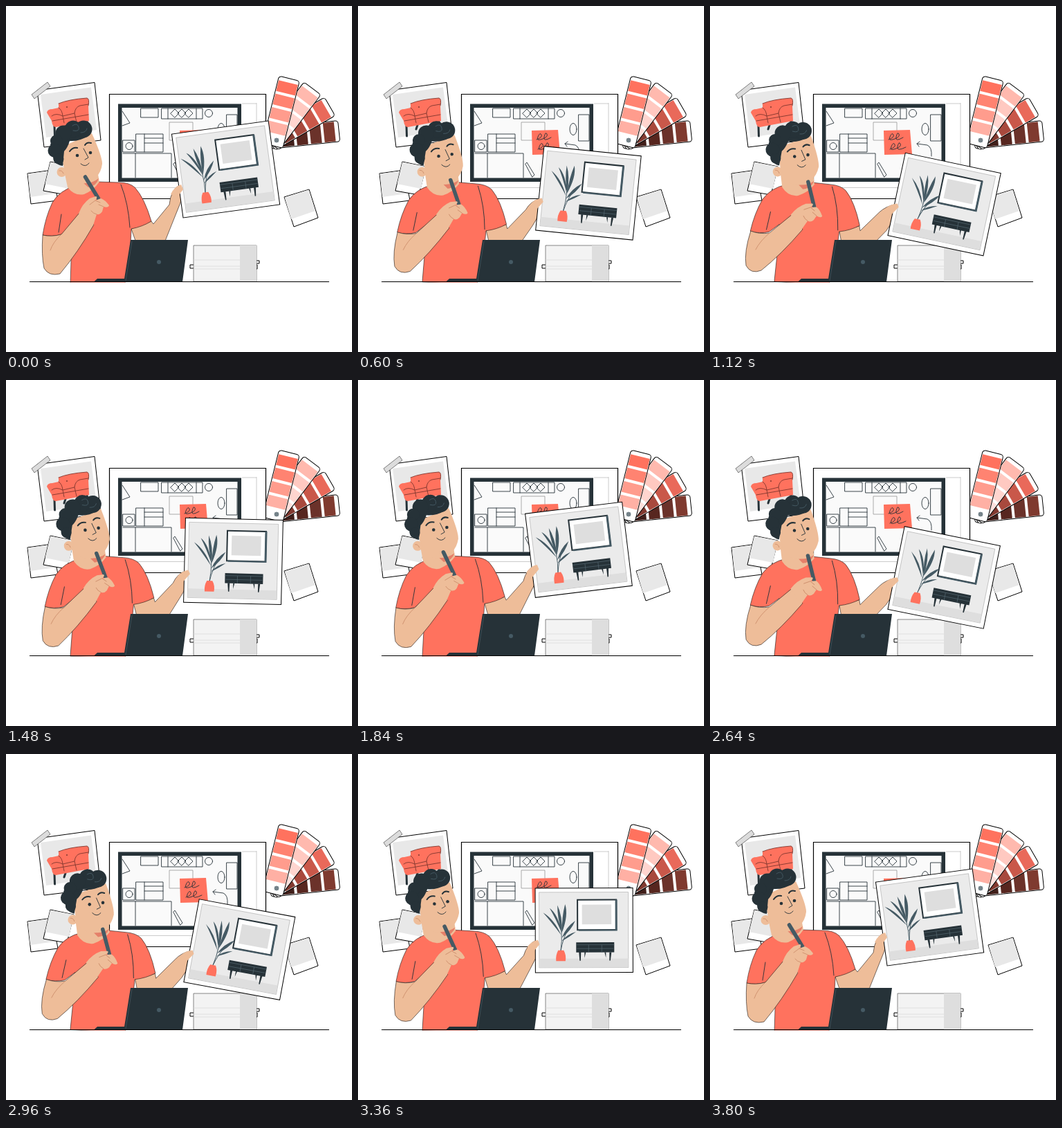
Animation, 500 px wide and 500 px high, one loop 3.88 s. Source, as an HTML page:

```html
<!DOCTYPE html>
<html lang="en">
<head>
<meta charset="utf-8">
<title>Interior designer</title>
<style>
  html, body { margin: 0; width: 100%; height: 100%; overflow: hidden; background: #fff; }
  svg { display: block; width: 100vw; height: 100vh; }
  .card { fill: #fff; stroke: #000; stroke-width: 1; }
  .grey { fill: #e8e8e8; }
  .ink { fill: #263238; }
  .slate { fill: #455a64; }
  .coral { fill: #ff725e; }
  .skin { fill: #eebd99; }
  .edge { stroke: #1d1715; stroke-width: .6; }
  .line { fill: none; stroke: #263238; stroke-width: .9; stroke-linecap: round; stroke-linejoin: round; }
  .faint { fill: none; stroke: #b5b5b5; stroke-width: .7; }
  .fold { fill: none; stroke: #c98a68; stroke-width: .8; stroke-linecap: round; }
</style>
</head>
<body>
<svg viewBox="0 0 500 500">
  <clipPath id="aboveDesk"><path d="M0 0H500V399.500H0Z"/></clipPath>

  <!-- pinned armchair picture -->
  <path class="card" d="M45 122 128 110.500 137 194 55 204Z"/>
  <path class="grey" d="M50 128 123 117.500 131 179 58 190Z"/>
  <path class="line" style="stroke-width:3" d="M70 173 70.500 188M86 172 84 178M116 164 118.500 172"/>
  <path class="coral" d="M76 141Q90 135 117 133Q121 134 119 144L120 166 72 175Q67 175 66 166L59 154Q60 149 67 149L76 147Z"/>
  <path class="line" style="stroke:#7d372f" d="M76 141Q90 135 117 133Q121 134 119 144M76 147Q81 150 82 159L99 155Q100 146 107 144L119 142M66 159Q72 154 82 159L84 169M99 155 102 168M67 166 119 157"/>
  <circle cx="88" cy="146" r="1" fill="#7d372f"/>
  <path d="M37 128 60 110 64 116 41 134Z" fill="#dcdcdc" stroke="#333" stroke-width=".6"/>

  <!-- loose cards -->
  <path class="card" d="M31 242 67 237 75 281 36 286Z"/>
  <path class="grey" d="M31.500 242.500 67 237.500 72 271 35 276Z"/>
  <path class="card" d="M64 225 98 232 88 273 54 267Z"/>
  <path class="grey" d="M64 225.500 98 232 91 264 56.500 257Z"/>
  <path class="card" d="M402 276 438 265 451 306 416 319Z"/>
  <path class="grey" d="M402.500 276.500 437.500 265.500 447 296 412 308Z"/>

  <g id="fan" transform="translate(391 194)"></g>

  <!-- monitor with floor plan -->
  <path class="card" style="stroke-width:1.200" d="M149.500 127.500H375.500V278.500H149.500Z"/>
  <path class="faint" d="M150 262.500H375M362 140V262M341 141H362"/>
  <rect x="164.750" y="144.250" width="172.500" height="107" fill="#fafafa" stroke="#263238" stroke-width="5.500"/>
  <path class="line" d="M168 152 179 169 168 173M195 148H220V161H195ZM225 148H284V163H225ZM234 148V163M275 148V163M319 157H334V195H319ZM169 194H186V211H169ZM188 185H227V211H188ZM200 185V211M200 191H227M200 198H227M169 213H239V248M187 213V248M242 228 244 226 255 244 252 247ZM299 199 314 201Q321 204 320 217M303 196 299 199 302 203"/>
  <path class="line" d="M238 155l6-6 6 6-6 6ZM248 155l6-6 6 6-6 6ZM258 155l6-6 6 6-6 6Z"/>
  <g class="line">
    <circle cx="293" cy="155" r="5.500"/><circle cx="178" cy="202.500" r="5"/>
    <ellipse cx="311" cy="178" rx="5" ry="8.500"/>
  </g>
  <path class="faint" style="stroke:#888" d="M236 168H270V194H236Z"/>
  <path class="coral" d="M251 180 289 179 292 214 252 215Z"/>
  <path class="line" d="M258 193q9-3 7-7t-5 3 7 3q8-3 6-7t-4 4 10 1M260 207q9-3 7-7t-5 3 7 3q8-3 6-7t-4 4 12 1"/>

  <!-- paper stack -->
  <path class="card" d="M266 374H273V379H266ZM355 368H366V372H355ZM355 374H363V380H355Z"/>
  <path d="M271 346H362V398H271Z" fill="#f3f3f3" stroke="#555" stroke-width=".7"/>
  <path d="M338 346H362V398H338Z" fill="#dedede"/>
  <path class="faint" style="stroke:#d4d4d4" d="M271 367H338M271 376H338M271 380H338"/>

  <!-- designer -->
  <path id="farArm" class="skin edge"/>
  <g clip-path="url(#aboveDesk)">
    <g id="torso">
      <path class="coral edge" d="M100 260Q78 266 67 284Q57 305 53 331Q66 334 80 330L94 318Q95 360 93 401L172 401 180 345 181 322Q197 319 210 311Q200 277 186 262Q178 255 163 255L132 254Z"/>
      <path class="line" d="M166 258Q177 286 179 320M80 301 76 327"/>
    </g>
  </g>
  <g id="head">
    <path class="skin" d="M84 238 89 262Q99 275 113 272Q127 266 135 254L132 238Z"/>
    <path d="M112 256Q124 257 134 249Q131 260 119 262Z" fill="#e5806a"/>
    <path class="skin" d="M78 205 85 240Q94 258 111 257Q136 252 139 228Q139 217 124 184Z"/>
    <circle class="skin" cx="80.500" cy="240" r="7"/>
    <path class="fold" d="M77 238q4-1 6 4"/>
    <g class="ink">
      <path d="M64 200 72 186 90 176 116 178 118 188Q106 196 92 195Q89 205 84 210L82 231Q74 230 69 223Z"/>
      <circle cx="112" cy="178" r="12.500"/><circle cx="97" cy="177.500" r="12"/><circle cx="83" cy="184" r="11.500"/>
      <circle cx="73" cy="195" r="9"/><circle cx="70.500" cy="209" r="10"/><circle cx="76" cy="221" r="7.500"/>
      <circle cx="103" cy="216" r="2.300"/><circle cx="122" cy="212" r="2.300"/>
    </g>
    <path class="line" style="stroke:#455a64" d="M96 173q7-5 9 2t-8 5M108 183q8 0 9-6"/>
    <path class="line" style="stroke-width:2" d="M92 210Q96 204 103 205M114 201Q117 196 123 198"/>
    <path class="line" d="M112 206 119 219 114 222M108 228Q115 234 120 227"/>
  </g>
  <path id="nearArm" class="skin edge"/>
  <path id="armFold" class="fold"/>
  <g id="hand">
    <path d="M114.500 247 134 279" stroke="#455a64" stroke-width="5.500" stroke-linecap="round"/>
    <path class="skin" d="M105 300Q110 286 121 278L130 275Q133 276 129 281L137 278Q143 280 149 288Q148 292 141 290L139 297Q136 302 131 301L126 317Z"/>
    <path class="fold" d="M121 287 129 281 136 284M141 290 134 287M131 301Q126 300 123 296"/>
  </g>

  <!-- held picture -->
  <g id="photo">
    <path class="card" d="M0 0H141V122H0Z"/>
    <path d="M5.500 6H134.500V115H5.500Z" fill="#ebebeb" stroke="#999" stroke-width=".5"/>
    <path d="M5.800 102H134.200V114.700H5.800Z" fill="#dedede"/>
    <path d="M61 17H117V60.500H61Z" fill="#fff" stroke="#263238" stroke-width="2"/>
    <path class="slate" d="M115.500 17H118.500V62H63L61 60H115.500Z"/>
    <path d="M67.500 24H110V52.500H67.500Z" fill="#dedede"/>
    <path class="ink" d="M59 78.500H114V93H59ZM63 93H66L65.500 105H64ZM107 93H110L108.500 105H107ZM71 93H73L71 101ZM100 93H102L102 101Z"/>
    <path d="M59 82H114M77 82V93M96 82V93M60 87.500H113" stroke="#53666f" stroke-width=".7"/>
    <g id="plant">
      <path class="line" style="stroke:#455a64" d="M36.500 92Q38 76 36 62M36.500 92Q39 70 46 58"/>
      <path class="slate" d="M36 68Q25 46 8 37Q21 50 36 68ZM37 66Q30 38 17 30Q26 43 37 66ZM37 64Q36 39 28 25Q29 45 37 64ZM37 64Q45 38 39 23Q35 43 37 64ZM37 72Q42 56 55 46Q50 60 37 72ZM37 77Q44 66 57 62Q48 70 37 77Z"/>
    </g>
    <path class="coral" d="M33 90H41Q45 97 43.500 105.500H30Q29 97 33 90Z"/>
  </g>
  <path id="thumb" class="skin"/>

  <!-- laptop and desk -->
  <path class="ink" d="M180 338H263L255 398.500H127L132 394H171Z"/>
  <path d="M182 340 173 397" stroke="#455a64" stroke-width=".7"/>
  <circle class="slate" cx="221" cy="370" r="3"/>
  <path d="M34 398.500H467" stroke="#000"/>
</svg>

<script>
const LOOP = 3880, STEP = 40;
const el = id => document.getElementById(id);
const place = (id, transform) => el(id).setAttribute('transform', transform);

const swatches = [
  [84, '#7f3a2f', '#6b322a', '#57261f', '#42201b'],
  [60, '#e9695a', '#c9584a', '#a8493d', '#823a30'],
  [37, '#ffb9ae', '#ffc9c1', '#ffd5cf', '#ffe0dc'],
  [14, '#ff725e', '#ff8371', '#ff9c8d', '#ffb0a4']
];
el('fan').innerHTML = swatches.map(([angle, ...tints]) =>
  `<g transform="rotate(${angle})"><rect class="card" x="-19" y="-91" width="30.500" height="100" rx="4"/>` +
  tints.map((tint, i) => `<rect x="-18" y="${-85 + i * 20}" width="28.500" height="16" fill="${tint}"/>`).join('') +
  '</g>').join('') + '<circle r="4" fill="#75838a" stroke="#fff"/>';

// Each limb is a leaning-back outline and a leaning-forward one.
const limbs = {
  farArm: ['M181 322 210 311 213 315 236 287Q238 265 252 258L257 267Q252 287 245 302L229 342 188 342Z',
           'M187 325 216 318 217 325 245 298Q254 290 268 287L275 291Q268 308 255 325L238 342 190 342Z'],
  nearArm: ['M53 331Q51 360 55 379Q62 391 78 387Q104 356 127 316L106 299 80 330Q66 334 53 331Z',
            'M59 325Q49 355 52 375Q59 388 74 382Q103 359 134 323L118 302 86 328Q71 330 59 325Z'],
  armFold: ['M80 330Q68 341 64 353', 'M86 328Q72 340 66 352'],
  thumb: ['M238 272Q243 261 253 258L256 265 247 277Z', 'M254 293Q260 287 271 286L273 291 263 301Z']
};
const NUMBER = /[\d.]+/g;
function blend([from, to], amount) {
  const ends = to.match(NUMBER);
  let i = 0;
  return from.replace(NUMBER, n => (+n + (ends[i++] - n) * amount).toFixed(2));
}

const leanKeys = [[0, 0], [980, 1.03], [1840, .32], [2760, 1], [3800, 0], [LOOP, 0]];
const tiltKeys = [[0, 0], [1000, 1.03], [1870, .04], [2760, 1], [3800, 0], [LOOP, 0]];
function ease(keys, t) {
  const i = keys.findIndex(([time]) => time > t);
  const [t0, v0] = keys[i - 1], [t1, v1] = keys[i];
  return v0 + (v1 - v0) * (1 - Math.cos(Math.PI * (t - t0) / (t1 - t0))) / 2;
}

function draw(now) {
  const t = Math.floor(now % LOOP / STEP) * STEP;
  const lean = ease(leanKeys, t), tilt = ease(tiltKeys, t);
  for (const id in limbs) el(id).setAttribute('d', blend(limbs[id], lean));
  place('torso', `rotate(${4.4 * lean} 130 398)`);
  place('head', `translate(${20.5 * lean} ${lean}) rotate(${5 * lean} 97 205)`);
  place('hand', `translate(${11 * lean} ${7 * lean}) rotate(${18 * lean} 122 300)`);
  place('photo', `translate(${256 + lean} ${306 + 26 * lean}) rotate(${-7.8 + 20.1 * tilt}) translate(0 -122)`);
  place('plant', `rotate(${9 * lean} 36.5 92)`);
}

const start = performance.now();
function tick() {
  draw(performance.now() - start);
  requestAnimationFrame(tick);
}
tick();
</script>
</body>
</html>
```
